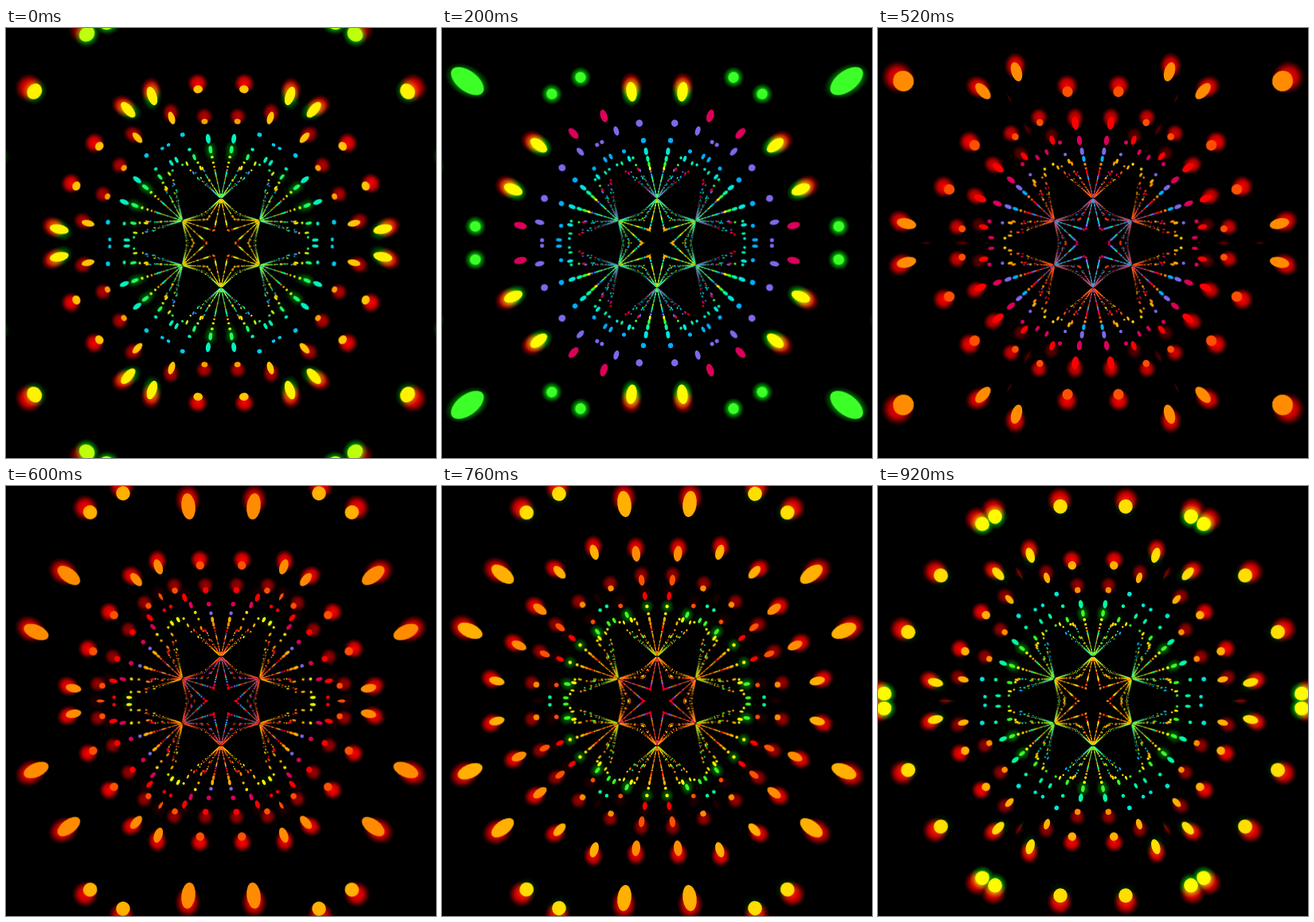
Animation of 540x540 px, one loop 960 ms. Source, as an HTML page with a canvas:

```html
<!DOCTYPE html>
<html lang="en">
<head>
<meta charset="utf-8">
<title>Kaleidoscope lights</title>
<style>
  html, body { margin: 0; width: 100%; height: 100%; overflow: hidden; background: #000; }
  canvas { display: block; width: 540px; height: 540px; }
</style>
</head>
<body>
<canvas id="stage" width="540" height="540"></canvas>
<script>
const LOOP = 960, STEP = 40, TAU = Math.PI * 2;
const out = document.getElementById('stage').getContext('2d');

// One 30 degree wedge is drawn here and mirrored twelve times.
const OX = 20, OY = 400;
const wedge = document.createElement('canvas');
wedge.width = 260;
wedge.height = 420;
const g = wedge.getContext('2d');

// Time in ms, then red, green, blue.
const PALETTE = [
  [0, 125, 105, 235], [80, 220, 0, 90], [160, 255, 0, 0], [240, 255, 80, 0],
  [320, 255, 140, 0], [420, 255, 185, 0], [510, 255, 240, 0], [580, 255, 255, 0],
  [640, 60, 255, 40], [720, 0, 255, 165], [800, 0, 232, 220], [880, 0, 175, 255],
  [960, 125, 105, 235]
];

// Per column and light: phase of the bobbing, and sense of the stretching.
const BOB = [[0, 0, 0, 0, 0, 0], [2.4, 3.1, 0, 0, 3.5, 2.6], [0, 1.9, 3.8, 5.7, 1.3, 3.2]];
const STRETCH = [[1, 1, -1, -1, -1, -1], [-1, -1, 1, -1, 1, 1], [1, -1, 1, -1, 1, -1]];

const mod = (a, n) => ((a % n) + n) % n;
const clamp = v => Math.max(0, Math.min(1, v));

function colorAt(time) {
  const i = PALETTE.findIndex(p => p[0] > time);
  const a = PALETTE[i - 1], b = PALETTE[i];
  const k = (time - a[0]) / (b[0] - a[0]);
  return `rgb(${[1, 2, 3].map(n => Math.round(a[n] + (b[n] - a[n]) * k))})`;
}

function glow(x, y, rx, ry, color, alpha) {
  if (alpha <= 0) return;
  const fade = g.createRadialGradient(0, 0, 0, 0, 0, 1);
  fade.addColorStop(0, `rgba(${color},${alpha})`);
  fade.addColorStop(0.5, `rgba(${color},${alpha * 0.75})`);
  fade.addColorStop(0.8, `rgba(${color},${alpha * 0.25})`);
  fade.addColorStop(1, `rgba(${color},0)`);
  g.save();
  g.translate(x, y);
  g.scale(rx, ry);
  g.fillStyle = fade;
  g.fillRect(-1, -1, 2, 2);
  g.restore();
}

// col 0..2 are the columns from the axis outward; side 1 is above, -1 below.
function light(z, m, col, side, t) {
  const beat = TAU * t / 320;
  const lead = col ? 0 : 4 / z ** 3;
  const height = 338 + 36 * Math.sin(beat + BOB[col][m] + lead);
  const x = 73 * (2 * col + 1) / z;
  const y = 56 + side * height / z;
  if (y < 0 || y > 395 || x > y * 0.578 + 24) return;

  const hueTime = mod(t - 200 - 80 * m + 80 * col - (side < 0 ? 160 : 0), LOOP);
  const w = Math.max(0.45, 17 / z ** 1.15);
  const len = w * (1.45 + 0.6 * STRETCH[col][m] * Math.cos(beat));

  if (side > 0 && z < 7) {
    const r = 6 + 19 / z;
    const red = clamp((hueTime - 110) / 50) * clamp((640 - hueTime) / 60);
    const green = clamp((hueTime - 460) / 100) * clamp((710 - hueTime) / 40);
    g.globalCompositeOperation = 'lighter';
    glow(x * 1.015, -y - 10 + z, r, r + (len - w) * 0.5, '255,0,0', red * clamp((5 - z) / 2));
    glow(x, -y, w + 7, len + 7, '0,215,0', green * clamp((7 - z) / 3));
    g.globalCompositeOperation = 'source-over';
  }

  g.fillStyle = colorAt(hueTime);
  g.beginPath();
  g.ellipse(x, -y, w, len, side * 0.55 * Math.atan2(x, height / z), 0, TAU);
  g.fill();
}

function drawWedge(t) {
  g.setTransform(1, 0, 0, 1, 0, 0);
  g.clearRect(0, 0, wedge.width, wedge.height);
  g.translate(OX, OY);
  for (let j = 200; j >= 0; j--) {
    const z = j + 0.53 - t / 160;
    if (z < 0.7) continue;
    const m = mod(j - 4, 6);
    for (let col = 2; col >= 0; col--) {
      light(z, m, col, 1, t);
      if (z > 6) light(z, m, col, -1, t);
    }
  }
}

function draw(t) {
  drawWedge(t);
  out.setTransform(1, 0, 0, 1, 0, 0);
  out.fillStyle = '#000';
  out.fillRect(0, 0, 540, 540);
  for (let i = 0; i < 12; i++) {
    out.save();
    out.translate(270, 270);
    out.rotate((i >> 1) * TAU / 6);
    if (i & 1) out.scale(-1, 1);
    out.beginPath();
    out.moveTo(-0.4, 0);
    out.lineTo(-0.4, -400);
    out.lineTo(231.4, -400);
    out.lineTo(0.4, 0);
    out.clip();
    out.drawImage(wedge, -OX, -OY);
    out.restore();
  }
}

let last = -1;
function tick() {
  const t = Math.floor(performance.now() % LOOP / STEP) * STEP;
  if (t !== last) draw(last = t);
  requestAnimationFrame(tick);
}
tick();
</script>
</body>
</html>
```
